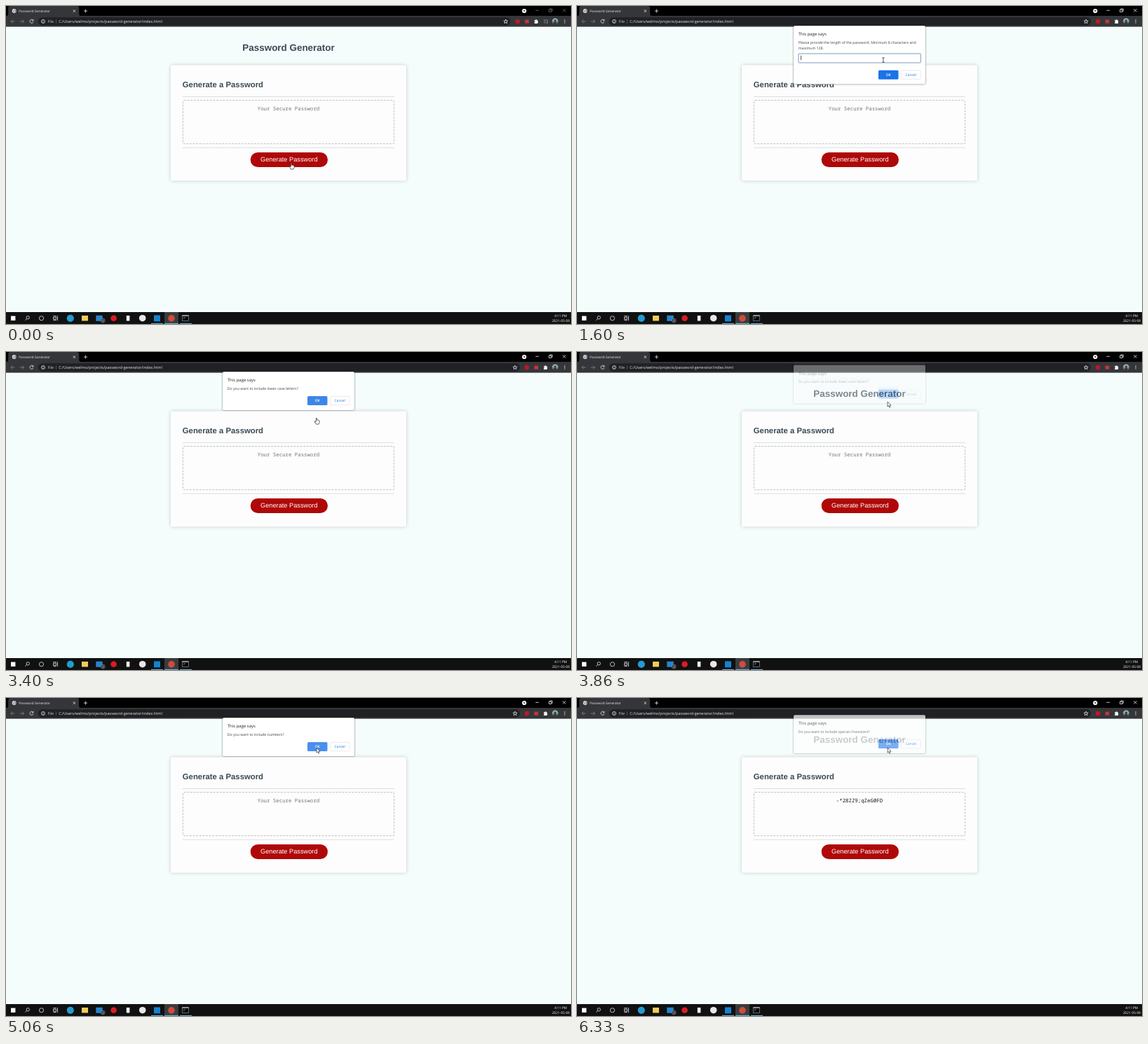
These frames come from a looping animation (806x454 px, 6.4 s). An HTML page:

```html
<!DOCTYPE html>
<html lang="en">
<head>
<meta charset="utf-8">
<title>Password Generator</title>
<style>
html, body { margin: 0; width: 100%; height: 100%; overflow: hidden; background: #f5fcfc; }
svg { display: block; width: 100%; height: 100%; }
text { font-family: "Open Sans", "Noto Sans", sans-serif; text-rendering: geometricPrecision; white-space: pre; }
.arial { font-family: "Liberation Sans", Arial, sans-serif; }
.mono { font-family: "Noto Sans Mono", "DejaVu Sans Mono", monospace; font-size: 7.39px; }
.mid { text-anchor: middle; }
.card { filter: drop-shadow(0 .8px 2.4px rgba(0, 0, 0, .2)); }
.dialog { filter: drop-shadow(0 .7px 1px rgba(0, 0, 0, .6)); }
.line { fill: none; stroke: #e8eaed; stroke-width: .8; }
.dim { stroke: #85888d; }
</style>
</head>
<body>
<svg viewBox="0 0 806 454" preserveAspectRatio="none">
  <rect width="806" height="454" fill="#f5fcfc"/>

  <!-- page -->
  <g fill="#3b4a54">
    <text class="arial mid" x="403" y="63.6" font-size="13.43" font-weight="700">Password Generator</text>
    <rect class="card" x="235" y="84.6" width="336" height="164.8" rx="2" fill="#fdfdfd"/>
    <text class="arial" x="251.8" y="116.3" font-size="11.33" font-weight="700">Generate a Password</text>
  </g>
  <path d="M252 129.5H554M252 202.2H554" stroke="#d3d6d8" stroke-width=".8"/>
  <rect x="252.4" y="134.5" width="301.2" height="62.2" rx="1.6" fill="none" stroke="#bfc1c3" stroke-width="1" stroke-dasharray="3 1.6"/>
  <text id="out" class="mono mid" x="403" y="149"></text>
  <rect x="348.7" y="209" width="110.3" height="21" rx="10.5" fill="#af0808"/>
  <text class="arial mid" x="403.8" y="222.4" font-size="9.235" fill="#fff">Generate Password</text>

  <!-- browser -->
  <rect width="806" height="15" fill="#000"/>
  <rect y="14" width="806" height="15.6" fill="#35363a"/>
  <path d="M0 14.2Q3.2 14.2 3.2 11V3.2Q3.2 0 6.4 0H101Q104.200 0 104.200 3.200V11Q104.200 14.200 107.400 14.200Z" fill="#35363a"/>
  <circle cx="11.600" cy="7" r="2.900" fill="#e8eaed"/>
  <path d="M9.600 6.200L11 7.300L10.900 9M11.800 4.700L12.300 6L13.700 6.700L12.900 8.500" fill="none" stroke="#35363a" stroke-width=".8"/>
  <text x="18.300" y="8.800" font-size="4.700" fill="#eceef0">Password Generator</text>
  <path class="line" d="M95.700 5.500L99 8.800M99 5.500L95.700 8.800M111 7.100H116M113.500 4.600V9.600"/>
  <circle cx="739.300" cy="7" r="3.100" fill="#fff"/>
  <path d="M737.800 6.200H740.800L739.300 8.300Z" fill="#111"/>
  <g id="controls" class="line">
    <path d="M755.500 6.300H760M774.600 5.200H778V8.400H774.600ZM775.700 5V4H779.200V7.400H778.200M794.300 4.200L798.500 8.400M798.500 4.200L794.300 8.400"/>
  </g>
  <path class="line dim" d="M12.500 22H7M9.400 19.500L6.900 22L9.400 24.500M19.900 22H25.500M23.100 19.500L25.600 22L23.100 24.500"/>
  <path class="line" d="M38.300 20.100A2.500 2.500 0 1 0 38.900 22.600M38.900 18.900V21H36.800"/>
  <rect id="bar" x="45.700" y="16.200" width="674" height="11.500" rx="5.700" fill="#202124"/>
  <circle class="line" cx="53" cy="22" r="2.500" stroke-width=".6"/>
  <path class="line" d="M53 21.700V23.500M53 20.300V21"/>
  <text x="59.400" y="24" font-size="5.550" fill="#c4c7cb">File</text>
  <path d="M71.500 19.300V24.700" stroke="#777a7f" stroke-width=".6"/>
  <text x="75.200" y="24" font-size="5.550" fill="#e8eaed">C:/Users/welmo/projects/password-generator/index.html</text>
  <g id="tools">
    <path class="line" stroke-width=".6" d="M712.900 19.100L713.700 21.100L715.900 21.200L714.200 22.600L714.800 24.700L712.900 23.500L711 24.700L711.600 22.600L709.900 21.200L712.100 21.100Z"/>
    <circle cx="729.800" cy="22" r="3.200" fill="#c61424"/>
    <rect x="740.300" y="19.600" width="5.600" height="5" fill="#c93438"/>
    <path d="M753.800 20.300H755.200A1.100 1.100 0 0 1 757.400 20.300H758.600V21.700A1.100 1.100 0 0 1 758.600 23.600V25H753.800V23.600A1 1 0 0 0 753.800 21.700Z" fill="#f1f3f4"/>
  </g>
  <g id="media">
    <path class="line dim" d="M767 20H772M767 22H770.500M767 24H769.500M772.500 24V20.500H773.700"/>
    <circle cx="771.700" cy="24" r="1" fill="#85888d"/>
  </g>
  <circle cx="783.400" cy="21.700" r="4.300" fill="#7f8c52"/>
  <path d="M779.100 21.700A4.300 4.300 0 0 1 787.700 21.700Z" fill="#93a9bd"/>
  <path d="M780.700 25.100Q781 22.500 783.300 22.500T786 25.100Q783.300 27 780.700 25.100Z" fill="#26354f"/>
  <circle cx="783.400" cy="21" r="1.500" fill="#26354f"/>
  <g fill="#e8eaed"><circle cx="797" cy="19.900" r=".7"/><circle cx="797" cy="22" r=".7"/><circle cx="797" cy="24.100" r=".7"/></g>

  <!-- taskbar -->
  <rect y="437" width="806" height="17" fill="#101110"/>
  <rect x="226" y="437" width="20" height="17" fill="#393c3c"/>
  <path d="M207 453.400H224M226 453.400H246M248 453.400H265" stroke="#76b9ed" stroke-width="1"/>
  <rect x="7" y="442.600" width="6.400" height="6.400" fill="#fff"/>
  <circle class="line" cx="31.200" cy="444.800" r="2.200"/>
  <path class="line" d="M29.600 446.400L27.400 448.800"/>
  <circle class="line" cx="50.500" cy="445.800" r="3.100" stroke-width="1"/>
  <path class="line" d="M67.500 443V442.700H71.700V443M67.500 444.300H71.700V447.200H67.500ZM67.500 448.700H71.700M73.500 442.300V449.200"/>
  <circle cx="91.800" cy="445.800" r="5.100" fill="#249bd2"/>
  <rect x="108" y="442" width="9" height="7.500" fill="#f3cb58"/>
  <rect x="128.300" y="441.800" width="9.500" height="8" fill="#2584d0"/>
  <circle cx="138.200" cy="449" r="3" fill="#3a3d40" stroke="#b8bbbd" stroke-width=".4"/>
  <text class="mid" x="138.200" y="450.600" font-size="4.300" fill="#fff">1</text>
  <circle cx="153.600" cy="445.700" r="4.300" fill="#dc1c24"/>
  <rect x="171.800" y="442" width="4.600" height="7.500" fill="#f1f1f1"/>
  <circle cx="194.700" cy="445.700" r="4.800" fill="#e9e5e9"/>
  <rect x="211" y="441.500" width="9" height="8.800" fill="#1683cf"/>
  <circle cx="236" cy="445.900" r="4.800" fill="#cf4b3d"/>
  <rect x="251.600" y="441.800" width="9" height="7.700" fill="#050505" stroke="#a5a7a8" stroke-width=".6"/>
  <path d="M251.600 442.200H260.600" stroke="#d7d9da" stroke-width="1"/>
  <path d="M253 444.700H256M253 446.200H254.600" stroke="#d7d9da" stroke-width=".5"/>
  <g class="mid" font-size="4.800" fill="#fff">
    <text x="791.200" y="443.500">4:11 PM</text>
    <text x="791.400" y="450.900">2021-05-08</text>
  </g>

  <g id="dialogs"></g>

  <g id="arrow"><path d="M0 0V7.100L1.600 5.600L2.700 8.200L3.900 7.700L2.800 5.200H5Z" fill="#fff" stroke="#111" stroke-width=".6"/></g>
  <g id="hand"><path d="M-.7 .8Q0 -.4 .7 .8V3.200Q1.500 2.700 2 3.500Q2.700 3 3.200 3.800Q4.200 3.500 4.200 4.700V6.300Q4 7.600 3.300 8.300V9H-.8V8.300Q-2.200 6.900 -3 5.200Q-2.500 4.100 -.7 5.600Z" fill="#fff" stroke="#111" stroke-width=".65"/></g>
  <g id="beam"><path d="M-1.600 -3.200H-.5L0 -2.800L.5 -3.200H1.600M0 -2.800V2.800M-1.600 3.200H-.5L0 2.800L.5 3.200H1.600" fill="none" stroke="#111" stroke-width=".75"/></g>
</svg>
<script>
const LOOP = 6400, STEP = 200 / 3, FADE = 200, EXIT = 260;
const $ = id => document.getElementById(id);
const show = (el, on) => el.setAttribute('visibility', on ? 'visible' : 'hidden');
const move = (el, x, y) => el.setAttribute('transform', `translate(${x} ${y})`);
const clamp = v => Math.min(1, Math.max(0, v));

const ask = what => [`Do you want to include ${what}?`];
const dialogs = [
  { open: 200, press: 3000, close: 3060, field: true,
    lines: ['Please provide the length of the password. Minimum 8 characters and', 'maximum 128.'] },
  { open: 3190, press: 3660, close: 3730, lines: ask('lower case letters') },
  { open: 3860, press: 4530, close: 4660, lines: ask('upper case letters') },
  { open: 4790, press: 5200, close: 5330, lines: ask('numbers') },
  { open: 5460, press: 6130, close: 6260, lines: ask('special characters') }
];

// time, x, y of the pointer's hot spot
const path = [
  [0, 407, 224], [400, 407, 224], [1330, 437, 77], [2390, 437, 77],
  [2730, 441, 92], [3000, 443, 94], [3400, 443, 94], [3660, 443, 71], [LOOP, 443, 71]
];
const pointers = [[0, 'hand'], [460, 'arrow'], [1190, 'beam'], [2520, 'arrow'], [3130, 'hand'], [3450, 'arrow']];
const typed = [[0, ''], [1860, '1'], [2200, '15']];
const caretOn = [[0, true], [1000, false], [1600, true]];

const at = (table, t) => table.filter(row => row[0] <= t).pop()[1];

function markup(d) {
  const y = d.field ? 91.700 : 63, h = d.field ? 83.300 : 54.800;
  const lines = d.lines.map((s, i) => `<text x="315.800" y="${53.700 + i * 8.400}" font-size="5.170" fill="#3c4043">${s}</text>`).join('');
  const field = d.field ? `<rect x="316" y="68" width="174.300" height="13" rx="1" fill="#fff" stroke="#6c8fb5" stroke-width=".9"/>
    <text class="value" x="319.300" y="76.300" font-size="5.200" fill="#222"></text>
    <path class="caret" d="M319.500 70.800V77.300" stroke="#111" stroke-width=".7"/>` : '';
  return `<rect class="dialog" x="309" y="28.200" width="188" height="${h}" rx="1.800" fill="#fff"/>
    <text x="315.800" y="42.200" font-size="5.980" fill="#202124">This page says</text>${lines}${field}
    <rect class="ok" x="430" y="${y}" width="28.500" height="13" rx="1.500"/>
    <rect x="462.400" y="${y + .3}" width="27.800" height="12.400" rx="1.500" fill="#fff" stroke="#dadce0" stroke-width=".6"/>
    <g class="mid" font-size="5" font-weight="600"><text x="444.200" y="${y + 8.100}" fill="#fff">OK</text>
    <text x="476.200" y="${y + 8.100}" fill="#1a73e8" font-weight="500">Cancel</text></g>`;
}

for (const d of dialogs) {
  d.el = document.createElementNS('http://www.w3.org/2000/svg', 'g');
  d.el.innerHTML = markup(d);
  d.ok = d.el.querySelector('.ok');
  $('dialogs').append(d.el);
}
const value = dialogs[0].el.querySelector('.value');
const caret = dialogs[0].el.querySelector('.caret');

function pointerAt(t) {
  const i = Math.max(1, path.findIndex(p => p[0] >= t));
  const [t0, x0, y0] = path[i - 1], [t1, x1, y1] = path[i];
  const u = clamp((t - t0) / (t1 - t0)), e = u * u * (3 - 2 * u);
  return [x0 + (x1 - x0) * e, y0 + (y1 - y0) * e];
}

function drawDialog(d, t, y) {
  const leave = d === dialogs[4] ? EXIT : FADE;
  const alpha = Math.min(clamp((t - d.open) / FADE), 1 - clamp((t - d.close) / leave));
  show(d.el, alpha > 0);
  d.el.setAttribute('opacity', alpha);
  move(d.el, 0, -14 * (1 - alpha));
  const hover = y < 77 ? '#4990ee' : '#3d86e8';
  d.ok.setAttribute('fill', d.field ? '#1a73e8' : hover);
}

function draw(t) {
  const active = t >= 60, [x, y] = pointerAt(t);
  $('controls').style.stroke = active ? '#f1f3f4' : '#6f7072';
  $('bar').setAttribute('width', active ? 687.300 : 674);
  move($('tools'), active ? 13.300 : 0, 0);
  show($('media'), !active);

  const done = t >= 6260;
  $('out').textContent = done ? '-*28ZZ9;qZeG0FD' : 'Your Secure Password';
  $('out').setAttribute('fill', done ? '#161616' : '#757575');

  for (const d of dialogs) drawDialog(d, t, y);
  const text = at(typed, t);
  value.textContent = text;
  move(caret, text.length * 2.970, 0);
  caret.setAttribute('opacity', at(caretOn, t) ? 1 : 0);

  const kind = at(pointers, t);
  for (const id of ['arrow', 'hand', 'beam']) {
    show($(id), id === kind);
    move($(id), x, y);
  }
}

const start = performance.now();
function tick() {
  const t = (performance.now() - start) % LOOP;
  draw(Math.floor((t + 6.700) / STEP) * STEP % LOOP);
  requestAnimationFrame(tick);
}
tick();
</script>
</body>
</html>
```
